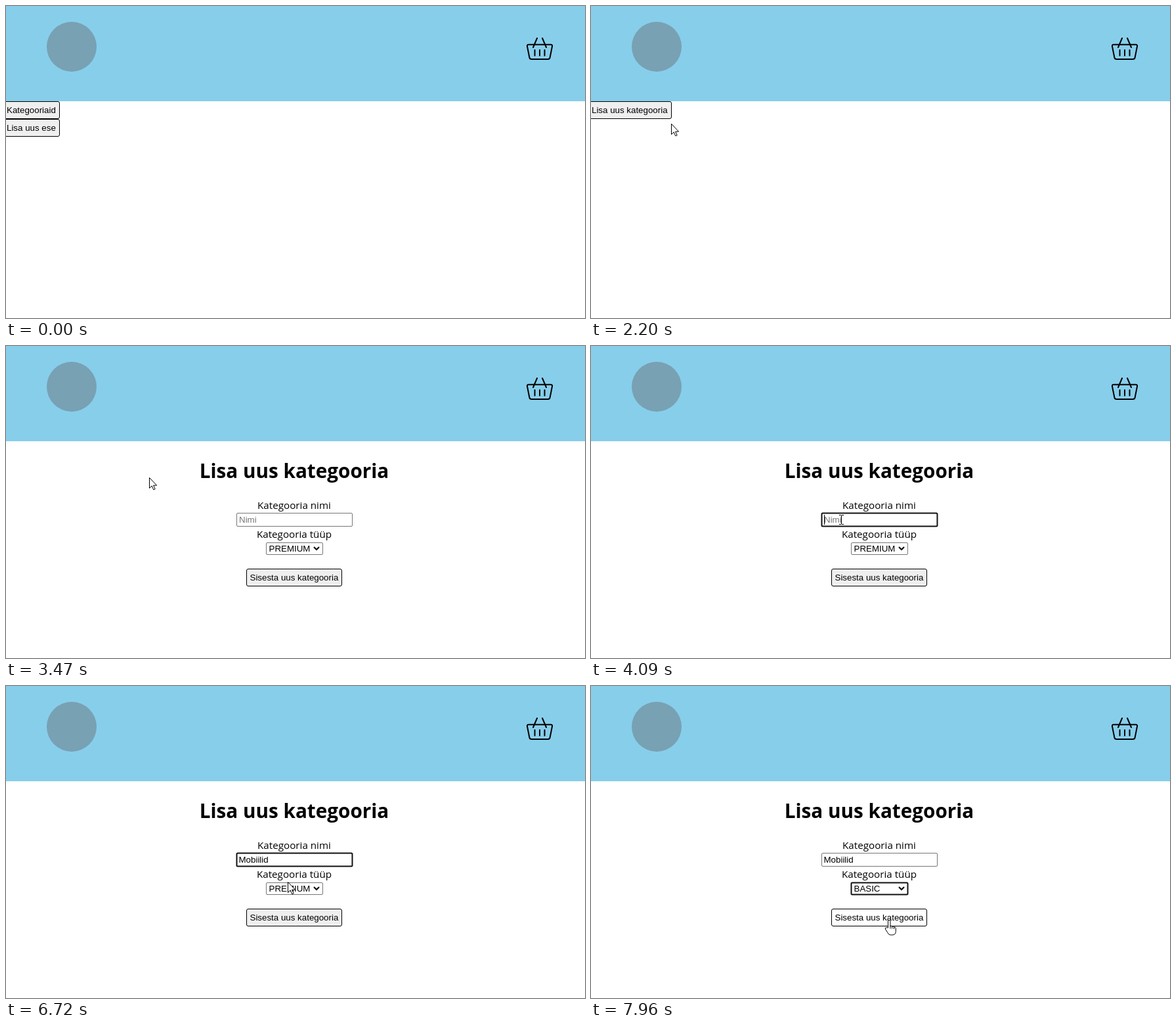
Animation, 882 px wide and 475 px high, one loop 8 s. Source, as an HTML page:

```html
<!DOCTYPE html>
<html lang="et">
<head>
<meta charset="utf-8">
<title>Lisa uus kategooria</title>
<style>
  html, body { margin: 0; width: 100%; height: 100%; overflow: hidden; background: #fff; }
  svg { display: block; width: 100%; height: 100%; }
  text { font: 13.333px "Liberation Sans", Arial, sans-serif; white-space: pre; }
  .label { font: 15.2px "Open Sans", "Noto Sans", sans-serif; text-anchor: middle; }
  .title { font: bold 29.7px "Open Sans", "Noto Sans", sans-serif; text-anchor: middle; }
  .btn { fill: #efefef; stroke: #000; }
  .btn.hover { fill: #fff; }
  .field { fill: #fff; stroke: #767676; }
  .field.focus { stroke: #101010; stroke-width: 2; }
  .line { fill: none; stroke: #000; stroke-width: 2; stroke-linecap: round; stroke-linejoin: round; }
  .cursor { fill: #fff; stroke: #000; stroke-linejoin: round; }
</style>
</head>
<body>
<svg viewBox="0 0 882 475" preserveAspectRatio="none">
  <defs>
    <filter id="shadow" x="-20%" y="-20%" width="140%" height="150%">
      <feDropShadow dx="0" dy="2" stdDeviation="2" flood-opacity=".3"/>
    </filter>
  </defs>

  <rect width="882" height="145" fill="#87ceeb"/>
  <circle cx="100" cy="62" r="38" fill="#78a1b3"/>
  <g class="line">
    <path d="M796 58.8H830Q832.6 58.8 832 61.5L828.6 78.5Q828 81 825.5 81H800.5Q798 81 797.4 78.5L794 61.5Q793.4 58.8 796 58.8Z"/>
    <path d="M803 63L809 49M823 63L817 49M805.5 67V75.5M813 67V75.5M820.5 67V75.5"/>
  </g>

  <g id="menu">
    <rect id="btnCats" class="btn" x="-5.5" y="145.5" width="87" height="26" rx="2.5"/>
    <rect id="btnItem" class="btn" x="-5.5" y="172.5" width="87" height="26" rx="2.5"/>
    <text x="1" y="163">Kategooriaid</text>
    <text x="1" y="190">Lisa uus ese</text>
  </g>

  <g id="cats">
    <rect id="btnNew" class="btn" x="-5.5" y="145.5" width="128" height="26" rx="2.5"/>
    <text x="1" y="163">Lisa uus kategooria</text>
  </g>

  <g id="form">
    <text class="title" x="439" y="201">Lisa uus kategooria</text>
    <text class="label" x="439" y="248">Kategooria nimi</text>
    <rect id="input" class="field" y="254.5" x="351.5" width="176" height="20" rx="1.5"/>
    <text id="hint" x="355" y="269" fill="#757575">Nimi</text>
    <text id="typed" x="354.5" y="269"></text>
    <path id="caret" d="M0 257V272" stroke="#000"/>
    <text class="label" x="439" y="292">Kategooria tüüp</text>
    <rect id="select" class="field" x="396.5" y="299.5" width="86" height="18" rx="1.5"/>
    <text id="choice" x="400.5" y="313"></text>
    <path d="M469 306L473 310L477 306" class="line" style="stroke-linecap:butt;stroke-linejoin:miter"/>
    <rect id="btnSend" class="btn" x="366.5" y="339.5" width="145" height="26" rx="2.5"/>
    <text x="371.5" y="357">Sisesta uus kategooria</text>
    <g id="popup">
      <rect x="396.5" y="318.5" width="86" height="51" fill="#fff" stroke="#6a6a6a" filter="url(#shadow)"/>
      <rect id="mark" x="397" width="85" height="16.5" fill="#1e90ff"/>
      <g id="options"></g>
    </g>
  </g>

  <circle id="click" r="12" fill="#f3ee3a" opacity=".8"/>
  <path id="arrow" class="cursor" d="M.5 .5V16.5L4.2 13L6.8 18.8L9.2 17.8L6.6 12.2H11.6Z"/>
  <g id="hand" class="cursor">
    <path d="M-1.5 13V3a1.7 1.7 0 0 1 3.4 0V10.5q1.3-1 2.8.6q1.5-.8 2.8.8q2.8-.3 2.8 2.2v4.4q0 5.5-5.5 5.5H2.3q-2.8 0-4.3-3.2l-3.6-5.8q-.5-2.6 2-2.2z"/>
    <path d="M1.9 10V14.5M4.7 11V14.5M7.5 12V15" fill="none"/>
  </g>
  <path id="beam" d="M-3.5 -6.5H-1L0 -6L1 -6.5H3.5M0 -6V7M-3.5 7.5H-1L0 7L1 7.5H3.5" fill="none" stroke="#000"/>
</svg>
<script>
const LOOP = 8000;
const el = id => document.getElementById(id);
const show = (id, on) => { el(id).style.display = on ? "" : "none"; };
const within = (t, a, b) => t >= a && t < b;

const WORD = "Mobiilid";
const KEY_TIMES = [4700, 4900, 5030, 5160, 5360, 5490, 5690, 5890];
const OPTIONS = ["PREMIUM", "DELUXE", "BASIC"];

// Pointer moves: start, end, steps, target x, target y
const MOVES = [
  [560, 560, 1, 295, 48], [620, 680, 2, 258, 138], [740, 800, 2, 158, 148],
  [1060, 1560, 8, 76, 153], [1610, 1750, 3, 75, 156],
  [2070, 2240, 3, 146, 190], [2300, 2440, 3, 134, 213], [2500, 2630, 3, 101, 198],
  [2700, 2760, 2, 92, 153],
  [3200, 3760, 9, 376, 258], [3820, 3820, 1, 381, 264],
  [6500, 6720, 4, 429, 298], [6790, 6860, 2, 440, 308],
  [7000, 7210, 4, 457, 342], [7280, 7350, 2, 458, 354], [7800, 7960, 3, 454, 355]
];
// Click highlight: on, off
const CLICKS = [[1880, 2000], [2960, 3200], [3970, 4090], [6860, 6930], [7680, 7740]];

const optionTexts = OPTIONS.map((name, i) => {
  const text = document.createElementNS("http://www.w3.org/2000/svg", "text");
  text.textContent = name;
  text.setAttribute("x", 401);
  text.setAttribute("y", 331 + i * 16.5);
  el("options").append(text);
  return text;
});

function pointerAt(t) {
  let x = 0, y = 0;
  for (const [start, end, steps, tx, ty] of MOVES) {
    if (t < start) break;
    const passed = end > start ? Math.floor((t - start) / (end - start) * (steps - 1) + 1e-6) : 0;
    const k = Math.min(1, (passed + 1) / steps);
    x += (tx - x) * k;
    y += (ty - y) * k;
  }
  return { x: Math.round(x), y: Math.round(y) };
}

function over(id, p) {
  const r = el(id), v = name => +r.getAttribute(name);
  return within(p.x, v("x"), v("x") + v("width")) && within(p.y, v("y"), v("y") + v("height"));
}

function hover(id, p, active) {
  const on = active && over(id, p);
  el(id).classList.toggle("hover", on);
  return on;
}

function drawForm(t, popup) {
  const focused = within(t, 3970, 6930);
  const count = KEY_TIMES.filter(k => t >= k).length;
  el("input").classList.toggle("focus", focused);
  el("select").classList.toggle("focus", t >= 7740);
  show("hint", !count);
  el("typed").textContent = WORD.slice(0, count);
  el("choice").textContent = OPTIONS[t >= 7740 ? 2 : 0];
  show("caret", within(t, 3970, 4500) || within(t, 4700, 6440));
  const width = count ? el("typed").getComputedTextLength() : 0;
  el("caret").setAttribute("transform", `translate(${Math.round(355 + width) + .5} 0)`);
  show("popup", popup);
}

function drawPopup(p) {
  const row = p.y >= 352 ? 2 : p.y >= 336 ? 1 : 0;
  el("mark").setAttribute("y", 319 + row * 16.5);
  optionTexts.forEach((text, i) => text.setAttribute("fill", i === row ? "#fff" : "#000"));
}

function draw(t) {
  const p = pointerAt(t);
  const menu = t < 2000, form = t >= 3200, cats = !menu && !form;
  const popup = within(t, 6930, 7740);
  show("menu", menu);
  show("cats", cats);
  show("form", form);
  if (form) drawForm(t, popup);
  if (popup) drawPopup(p);

  const seen = t >= 560;
  const hovers = [
    hover("btnCats", p, seen && menu),
    hover("btnItem", p, seen && menu),
    hover("btnNew", p, cats),
    hover("btnSend", p, form && !popup)
  ];
  const hand = hovers.includes(true);
  const beam = form && over("input", p);
  show("hand", hand);
  show("beam", beam);
  show("arrow", seen && !hand && !beam);
  show("click", CLICKS.some(([a, b]) => within(t, a, b)));
  for (const id of ["hand", "arrow", "click"]) el(id).setAttribute("transform", `translate(${p.x} ${p.y})`);
  el("beam").setAttribute("transform", `translate(${p.x + .5} ${p.y})`);
}

let begin;
function tick(now) {
  begin ??= now;
  draw((now - begin) % LOOP);
  requestAnimationFrame(tick);
}
draw(0);
requestAnimationFrame(tick);
</script>
</body>
</html>
```
